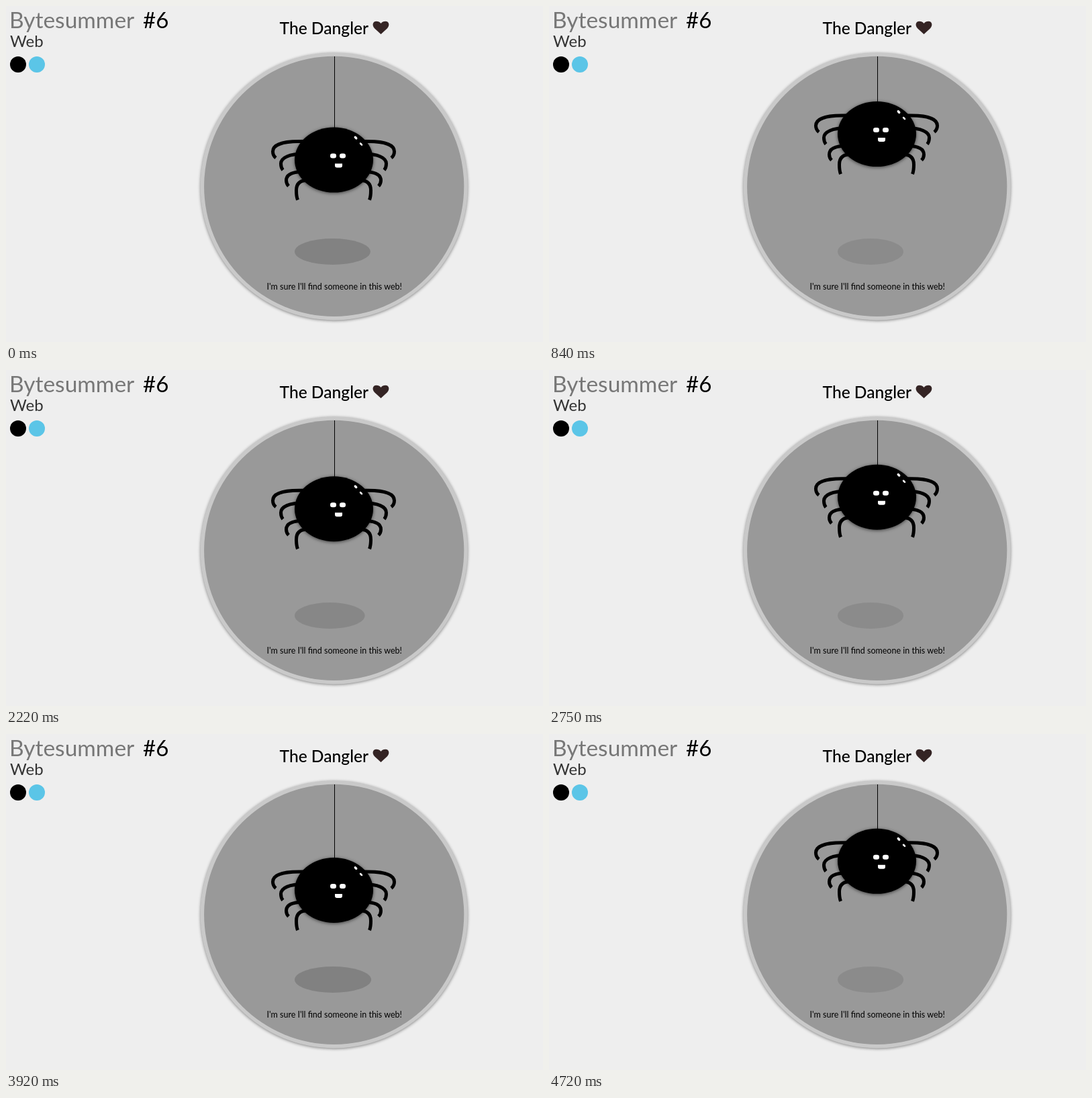
An HTML page for the animation above (4800 ms loop, 800 by 500 pixels).

```html
<!DOCTYPE html>
<html lang="en">
<head>
<meta charset="utf-8">
<title>Web</title>
<style>
  html, body { margin: 0; width: 100%; height: 100%; overflow: hidden; background: #eee; }
  svg { display: block; width: 800px; height: 500px; font-family: Lato, "Open Sans", sans-serif; }
  .disc { filter: drop-shadow(0 1px 2px rgba(0, 0, 0, .45)); }
  .body { filter: drop-shadow(0 1px 2.5px rgba(0, 0, 0, .6)); }
  .legs { fill: none; stroke: #000; stroke-width: 5; }
</style>
</head>
<body>
<svg viewBox="0 0 800 500">
  <text x="5" y="33" font-size="33.5" fill="#777">Bytesummer</text>
  <text x="204" y="33" font-size="33">#6</text>
  <text x="6" y="60.5" font-size="24" fill="#333">Web</text>
  <circle cx="18" cy="87" r="12"/>
  <circle cx="46" cy="87" r="12" fill="#5bc5e7"/>

  <text x="407.5" y="41.5" font-size="24.6" font-weight="500">The Dangler</text>
  <path fill="#342424" d="M558.5 42 L549 33.2 C545 29 546 23 551.8 22.8 Q556 22.8 558.5 26 Q561 22.8 565.2 22.8 C571 23 572 29 568 33.2 Z"/>

  <circle class="disc" cx="488.7" cy="268.4" r="199" fill="#c9c9c9"/>
  <circle cx="488.7" cy="268.4" r="193.6" fill="#999"/>
  <ellipse id="shadow" cy="365.5" ry="19.5"/>
  <text x="388.5" y="422" font-size="12.5">I'm sure I'll find someone in this web!</text>

  <rect id="thread" x="489" y="75" width="1"/>
  <!-- The spider is drawn with the top of its body at y = 0 -->
  <g id="spider">
    <g class="legs">
      <g id="side">
        <path d="M446 21 H436 C412 21 397.5 26 397.5 36 Q397.5 42 402 45.5"/>
        <path d="M444 39.5 C422 39.5 409.5 45 409.5 54 Q409.5 60 412.5 63.5"/>
        <path d="M444 66 C425 66 417.5 71 417.5 79 Q417.5 84 421 87.5"/>
        <path d="M448 79 C438 79 432.5 84 432.5 94 Q432.5 103 434.5 108"/>
      </g>
      <use href="#side" transform="matrix(-1 0 0 1 976 0)"/>
    </g>
    <ellipse class="body" cx="488.5" cy="48.5" rx="58.5" ry="48.5"/>
    <g fill="#fff">
      <rect x="483" y="39" width="9" height="7" rx="3.3"/>
      <rect x="497" y="39" width="9" height="7" rx="3.3"/>
      <path d="M490 54 H501 V57 Q501 60 498 60 H493 Q490 60 490 57 Z"/>
      <ellipse cx="521" cy="15.5" rx="2.9" ry="1.8" transform="rotate(45 521 15.5)"/>
      <ellipse cx="529" cy="25" rx="2.8" ry="1.4" transform="rotate(45 529 25)"/>
    </g>
  </g>
</svg>
<script>
const LOOP = 4800;
const PERIOD = 1985;
const LEAD = 118;                        // how far the first rise is under way at the loop start
const PAUSE = { from: 840, to: 1440 };   // the picture stands still, then jumps on

const [spider, thread, shadow] = ["spider", "thread", "shadow"].map(id => document.getElementById(id));
const lerp = (a, b, mix) => a + (b - a) * mix;

// The CSS "ease" curve, cubic-bezier(.25, .1, .25, 1)
function ease(x) {
  if (x <= 0) return 0;
  if (x >= 1) return 1;
  let low = 0, high = 1, s;
  for (let i = 0; i < 20; i++) {
    s = (low + high) / 2;
    if (0.75 * s * (1 - s) + s ** 3 < x) low = s; else high = s;
  }
  return 0.3 * s * (1 - s) ** 2 + 3 * s * s * (1 - s) + s ** 3;
}

// 1 at the lowest point, 0 at the highest: a one-second rise, then a fall
function drop(time, fallStart, fallLength) {
  const phase = (time + LEAD) % PERIOD;
  return 1 - ease(phase / 1000) + ease((phase - fallStart) / fallLength);
}

function draw(now) {
  let time = now % LOOP;
  if (time > PAUSE.from && time < PAUSE.to) time = PAUSE.from;

  const top = lerp(140.4, 186.4, drop(time, 910, 900));
  spider.setAttribute("transform", `translate(0 ${top})`);
  thread.setAttribute("height", top - 74);

  const spread = drop(time, 980, 950);
  const radius = lerp(49, 57.5, spread);
  shadow.setAttribute("cx", 430 + radius);
  shadow.setAttribute("rx", radius);
  shadow.setAttribute("fill-opacity", lerp(0.09, 0.16, spread));
}

const start = performance.now();
function tick() {
  draw(performance.now() - start);
  requestAnimationFrame(tick);
}
tick();
</script>
</body>
</html>
```
